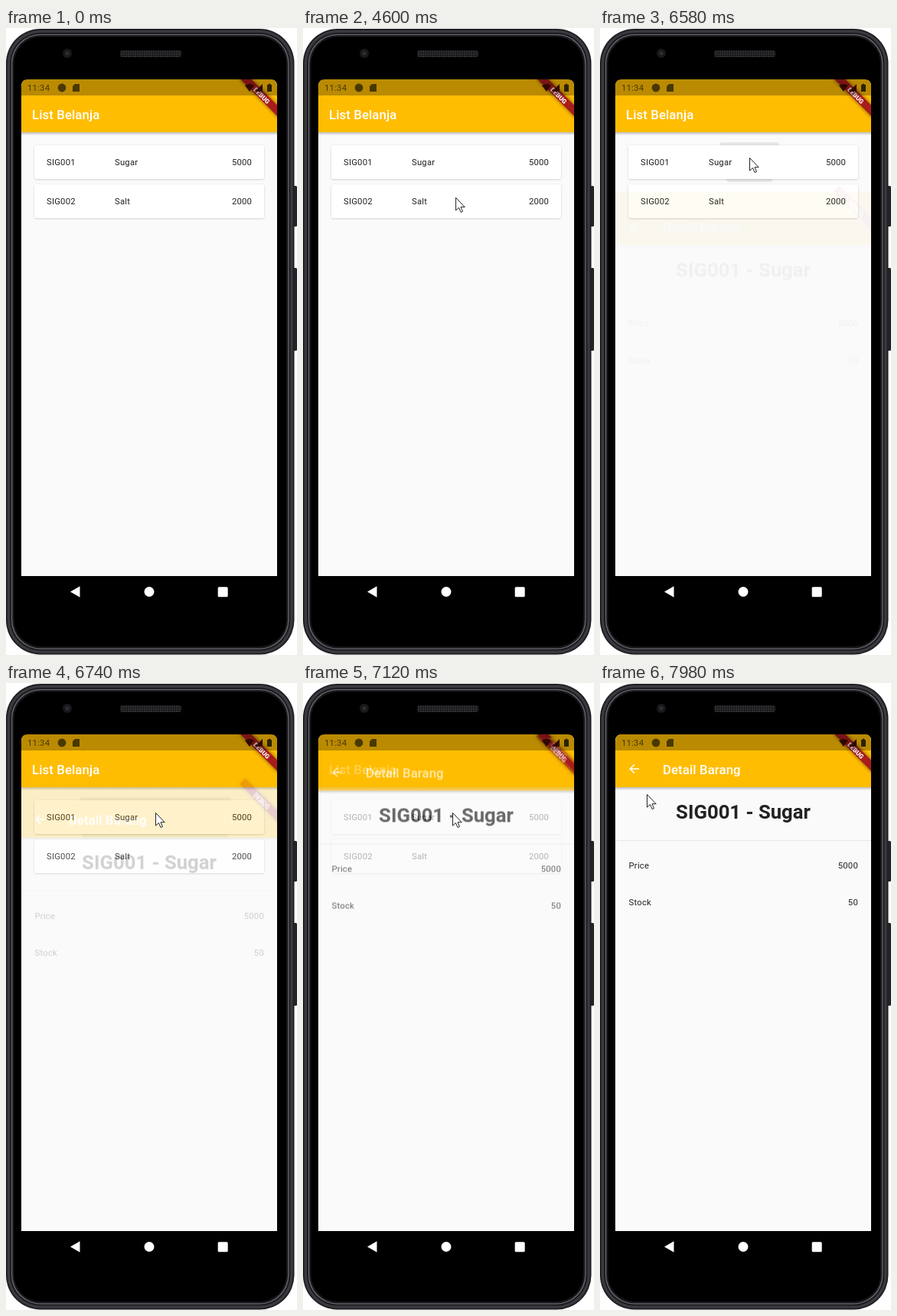
These frames come from a looping animation (380x818 px, 8 s). An HTML page:

```html
<!DOCTYPE html>
<html lang="id">
<head>
<meta charset="utf-8">
<title>List Belanja</title>
<style>
  html, body { margin: 0; width: 100%; height: 100%; overflow: hidden; background: #fff; }
  svg { display: block; font: 11.34px Roboto, sans-serif; letter-spacing: .2px; }
  .title { font-size: 16.7px; font-weight: 500; letter-spacing: .12px; fill: #fff; }
  .head { font-size: 25.7px; font-weight: 700; letter-spacing: 0; text-anchor: middle; }
  .end { text-anchor: end; }
  .page { fill: #222; }
</style>
</head>
<body>
<svg id="stage" width="380" height="818" viewBox="0 0 380 818"></svg>
<script>
const LOOP = 8000;
const stage = document.getElementById('stage');

const rect = (x, y, w, h, fill, more = '') =>
  `<rect x="${x}" y="${y}" width="${w}" height="${h}" fill="${fill}" ${more}/>`;
const text = (x, y, s, cls = '') => `<text x="${x}" y="${y}" class="${cls}">${s}</text>`;
const ring = (inset, r, fill) =>
  rect(inset, 1 + inset, 376.5 - 2 * inset, 816.5 - 2 * inset, fill, `rx="${r}"`);

const banner = `<g transform="translate(354 68) rotate(45)">
  ${rect(-36, 23, 72, 10, '#a81c1c', 'filter="url(#soft)"')}
  <text y="31.5" text-anchor="middle" fill="#fff" style="font-size:8.2px;font-weight:900;letter-spacing:0">DEBUG</text></g>`;

const page = body => rect(20, 68, 334, 647, '#fafafa') + body +
  rect(20, 136, 334, 4, 'url(#shade)') + rect(20, 67, 334, 69, '#ffbd02');

const card = (y, code, name, price) =>
  rect(37, y, 300, 44, '#fff', 'rx="3" filter="url(#lift)"') +
  text(53, y + 26, code) + text(142, y + 26, name) + text(321.2, y + 26, price, 'end');

const row = (y, label, value) => text(37.5, y, label) + text(337, y, value, 'end');

const listPage = page(
  '<g clip-path="url(#ink)"><circle id="ripple" cx="195" cy="169" r="0" fill="#c8c8c8"/></g>' +
  card(153, 'SIG001', 'Sugar', '5000') + card(204, 'SIG002', 'Salt', '2000')
) + text(34, 118.5, 'List Belanja', 'title') + banner;

const detailPage = page(
  text(187, 177, 'SIG001 - Sugar', 'head') + rect(20, 205, 334, 1, '#e8e8e8') +
  row(241.5, 'Price', '5000') + row(289.5, 'Stock', '50')
) + text(82, 118.5, 'Detail Barang', 'title') +
  '<path d="M51 112H39.5M45 106.3L39.3 112L45 117.7" fill="none" stroke="#fff" stroke-width="1.6"/>' + banner;

const statusBar = rect(20, 67, 334, 21, '#000', 'opacity=".27"') +
  `<g fill="#493800">${text(28, 82, '11:34')}
    <circle cx="73" cy="78" r="5.4"/>
    <path d="M90 73h6v10h-9v-7z"/>
    <path fill="#300800" d="M312 75q6-4 12 0l-6 8zM335 73v10h-10z"/>
    <path fill="#2c2200" d="M341 74h1.7v-1.2h2.6v1.2h1.7v9h-6z"/></g>`;

stage.innerHTML = `
  <defs>
    <filter id="soft" x="-20%" y="-100%" width="140%" height="300%">
      <feDropShadow dx="0" dy="0" stdDeviation="2.4" flood-opacity=".6"/></filter>
    <filter id="lift" x="-5%" y="-20%" width="110%" height="150%">
      <feDropShadow dx="0" dy=".7" stdDeviation=".8" flood-opacity=".2"/></filter>
    <linearGradient id="shade" x2="0" y2="1">
      <stop stop-opacity=".25"/><stop offset="1" stop-opacity="0"/></linearGradient>
    <pattern id="mesh" width="3" height="3" patternUnits="userSpaceOnUse">
      ${rect(0, 0, 3, 3, '#17171a')}${rect(0, 0, 2, 2, '#323236')}</pattern>
    <clipPath id="ink">${rect(37, 149, 300, 52, '#000')}</clipPath>
    <clipPath id="screen"><path d="M20 715V76q0-9 9-9h316q9 0 9 9v639z"/></clipPath>
  </defs>
  ${rect(374, 206, 6, 53, '#242428', 'rx="1.5"')}${rect(374, 313, 6, 108, '#242428', 'rx="1.5"')}
  ${ring(0, 45, '#202024')}${ring(2, 43, '#3a3a40')}${ring(5, 40, '#1c1c20')}
  ${ring(7, 38, '#66666e')}${ring(8.3, 37, '#18181b')}${ring(10.5, 35, '#000')}
  <circle cx="80" cy="33" r="6" fill="#19191c"/><circle cx="80" cy="33" r="2.5" fill="#2e2e34"/>
  ${rect(149, 29, 80, 9, 'url(#mesh)', 'rx="3"')}
  <g clip-path="url(#screen)" class="page">
    ${listPage}<g id="detail">${detailPage}</g>${statusBar}
  </g>
  <g fill="#fff"><path d="M84 735.5L96.5 728.3V742.7Z"/><circle cx="187" cy="735.5" r="6.5"/>
    ${rect(276.7, 729.2, 13, 13, '#fff', 'rx="1.5"')}</g>
  <path id="cursor" d="M0 0V16.6L4 13L6.6 19L9 18L6.5 12.2H11.7Z" fill="#fff" stroke="#222" stroke-width="1"/>`;

const [ripple, detail, cursor] = ['ripple', 'detail', 'cursor'].map(id => document.getElementById(id));

// Value at time t along [time, value] stops.
function along(stops, t) {
  if (t <= stops[0][0]) return stops[0][1];
  for (let i = 1; i < stops.length; i++) {
    const [t0, a] = stops[i - 1], [t1, b] = stops[i];
    if (t <= t1) return a + (b - a) * (t - t0) / (t1 - t0);
  }
  return stops.at(-1)[1];
}

function bezier(x1, y1, x2, y2) {
  const at = (a, b, s) => 3 * a * s * (1 - s) ** 2 + 3 * b * s * s * (1 - s) + s ** 3;
  return x => {
    let lo = 0, hi = 1;
    for (let i = 0; i < 24; i++) {
      const mid = (lo + hi) / 2;
      if (at(x1, x2, mid) < x) lo = mid; else hi = mid;
    }
    return at(y1, y2, lo);
  };
}
const slide = bezier(.4, 0, .2, 1), fade = bezier(.42, 0, 1, 1);

const progress = [[6580, .167], [6740, .39], [7120, .79], [7300, 1]];
const cursorX = [[4600, 199], [4740, 211], [4840, 210], [4960, 194], [5020, 195], [7560, 195], [7980, 61]];
const cursorY = [[4600, 221], [4740, 205], [4840, 190], [4960, 171], [5020, 169], [7560, 169], [7980, 145]];

function draw(t) {
  // The transition stalls briefly.
  const u = t > 6740 && t < 6840 ? 6740 : t;
  const open = u >= 6580, p = along(progress, u);
  detail.setAttribute('opacity', open ? fade(p) : 0);
  detail.setAttribute('transform', `translate(0 ${161.5 * (1 - slide(p))})`);
  ripple.setAttribute('r', open ? along([[6580, 42], [6740, 100], [6900, 160]], u) : 0);
  ripple.setAttribute('opacity', along([[6580, .4], [6740, .25], [7000, 0]], u));
  cursor.setAttribute('visibility', t < 4600 ? 'hidden' : 'visible');
  cursor.setAttribute('transform', `translate(${along(cursorX, t) + .5} ${along(cursorY, t) + .5})`);
}

const start = performance.now();
function tick() {
  draw((performance.now() - start) % LOOP);
  requestAnimationFrame(tick);
}
tick();
</script>
</body>
</html>
```
